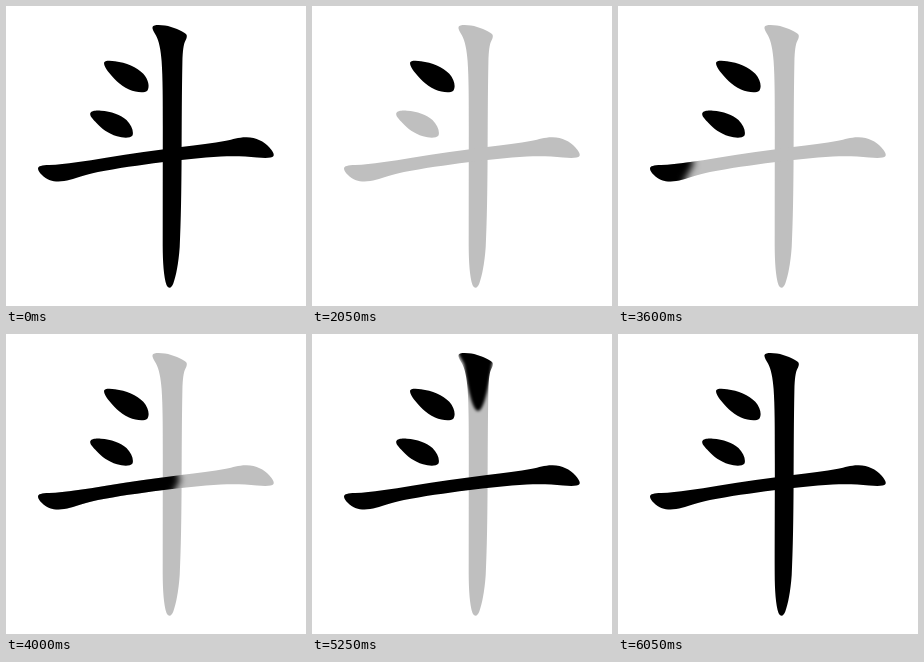
Write an HTML page that moves like this. It is 300 px wide and 300 px high and loops after 7050 ms.

```html
<!DOCTYPE html>
<html lang="zh">
<head>
<meta charset="utf-8">
<title>斗 stroke order</title>
<style>
html, body { margin: 0; width: 100%; height: 100%; overflow: hidden; background: #fff; }
svg { display: block; width: 100vw; height: 100vh; }

.ink, .brush { animation: 7050ms step-end infinite; }
.ink { fill: #000; }
.brush { transform: translateX(-60px); }

#dot1 { animation-name: ink1; }
#dot2 { animation-name: ink2; }
#across { animation-name: ink3; }
#down { animation-name: ink4; }
.b1 { animation-name: brush1; }
.b2 { animation-name: brush2; }
.b3 { animation-name: brush3; }
.b4 { animation-name: brush4; }

/* Each stroke turns grey, then black once its brush has passed */
@keyframes ink1 { 0%, 29.077% { fill: #000; } 14.184% { fill: #bfbfbf; } }
@keyframes ink2 { 0%, 40.425% { fill: #000; } 14.184% { fill: #bfbfbf; } }
@keyframes ink3 { 0%, 62.411% { fill: #000; } 14.184% { fill: #bfbfbf; } }
@keyframes ink4 { 0%, 85.815% { fill: #000; } 14.184% { fill: #bfbfbf; } }

@keyframes brush1 {
  0%, 29.077% { transform: translateX(-60px); }
  24.822% { transform: translateX(17px); }
  26.241% { transform: translateX(33px); }
  27.659% { transform: translateX(50px); }
}
@keyframes brush2 {
  0%, 40.425% { transform: translateX(-60px); }
  36.17% { transform: translateX(17px); }
  37.588% { transform: translateX(33px); }
  39.007% { transform: translateX(49px); }
}
@keyframes brush3 {
  0%, 62.412% { transform: translateX(-60px); }
  47.517% { transform: translateX(8px); }
  48.936% { transform: translateX(25px); }
  51.063% { transform: translateX(45px); animation-timing-function: steps(8); }
  62.411% { transform: translateX(243px); }
}
@keyframes brush4 {
  0%, 85.816% { transform: translateX(-60px); }
  69.503% { transform: translateX(12px); }
  70.921% { transform: translateX(24px); }
  72.34% { transform: translateX(36px); }
  74.468% { transform: translateX(59px); animation-timing-function: steps(8); }
  85.815% { transform: translateX(274px); }
}
</style>
</head>
<body>
<svg viewBox="0 0 300 300">
  <defs>
    <filter id="soft" x="-10%" y="-10%" width="120%" height="120%"><feGaussianBlur stdDeviation="1.8"/></filter>
    <filter id="softer" x="-10%" y="-10%" width="120%" height="120%"><feGaussianBlur stdDeviation="3.5"/></filter>
    <path id="point" d="M-47-14Q47 0-47 14L-131 60H-400V-60H-131Z" filter="url(#soft)"/>
    <path id="edge" d="M0-5L-12 12L-20 60H-400V-60H-20Z" filter="url(#softer)"/>
    <clipPath id="c1"><use href="#dot1"/></clipPath>
    <clipPath id="c2"><use href="#dot2"/></clipPath>
    <clipPath id="c3"><use href="#across"/></clipPath>
    <clipPath id="c4"><use href="#down"/></clipPath>
  </defs>

  <path id="down" class="ink" d="M146.500 21C147.500 18.300 154 18.700 159 19.500C167 20.800 176 25 180 28C181.500 29.500 180.800 32 179.500 34.500C177.500 38 176.700 45 176.400 56C175.800 85 175.800 115 175.600 150C175.400 185 175 215 173.700 241C172.500 258 170 270 167.300 277.500C165.500 282.500 162.500 283 160.500 279C157.700 271 156.800 256 156.700 240C156.500 200 157 160 156.800 120C156.800 95 156.800 72 155.600 55C154.800 44 153 35 150 29.500C148 26 146 23 146.500 21Z"/>
  <g clip-path="url(#c4)"><g transform="translate(166 18) rotate(90)"><use href="#point" class="brush b4"/></g></g>

  <path id="across" class="ink" d="M32 162.500C32 160 36 159.200 43 159C60 158.500 80 155 100 151.800C125 147.600 150 144.300 175 141C192 139 207 137.200 220 134.800C227 133.300 232 131.300 240 131.200C250 131 258 135.500 263 141C266.500 145 268.500 148 267.500 150C266 152.300 259 152.300 251 151.500C240 150.300 228 150 215 150.500C195 151.700 175 153.800 156 156.200C134 159 110 162.400 92 166C80 168.500 72 171.500 64 173.800C57 175.800 49 176 44 174.200C38 172 32 166 32 162.500Z"/>
  <g clip-path="url(#c3)"><g transform="translate(32 167) rotate(-6.500)"><use href="#edge" class="brush b3"/></g></g>

  <path id="dot2" class="ink" d="M84.200 107.500C85 104.700 90 104.300 95 104.700C105 105.200 115 109 120.500 114C125.500 119 128 125.500 126.500 129.500C124 132.500 117 132 111 130.300C102 127.500 95.500 122.500 90.500 117C87.500 113.500 83.800 110.500 84.200 107.500Z"/>
  <g clip-path="url(#c2)"><g transform="translate(84 105) rotate(32)"><use href="#edge" class="brush b2"/></g></g>

  <path id="dot1" class="ink" d="M98 57C98 54.300 104 54.500 109 55.200C120 56.500 131 61.300 137.300 67.700C142.500 73.500 144 81 141.300 84.700C138 87.300 130 86.300 123 83.500C113.500 79 107 71.700 102 65.500C99.800 62.500 98 59.500 98 57Z"/>
  <g clip-path="url(#c1)"><g transform="translate(98 55) rotate(34)"><use href="#edge" class="brush b1"/></g></g>
</svg>
</body>
</html>
```
